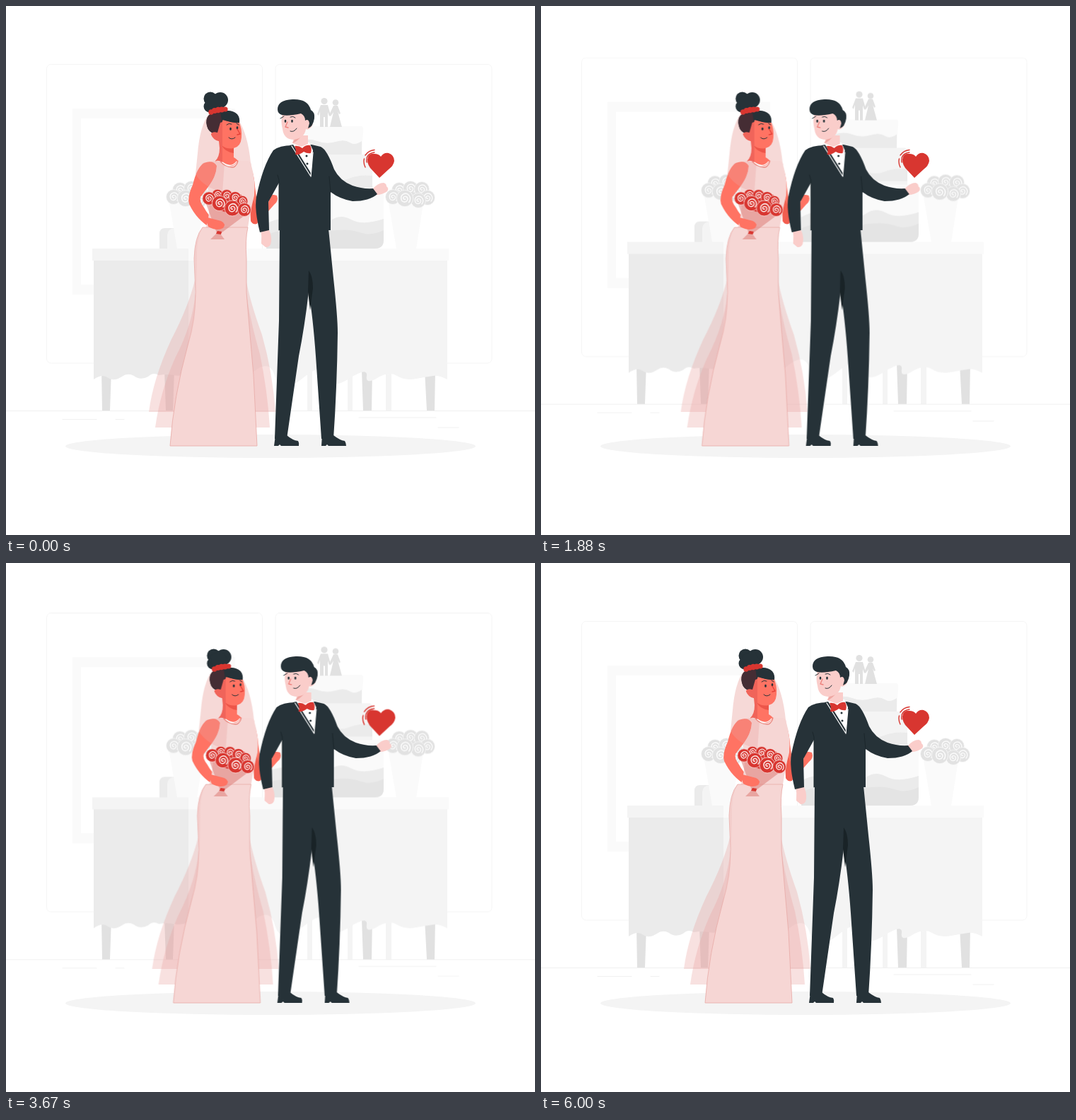
These frames come from a looping animation (748 px wide and 748 px high, 6.04 s). An HTML page without scripts:

```html
<!DOCTYPE html>
<html lang="en">
<head>
<meta charset="utf-8">
<title>Wedding couple</title>
<style>
html, body { margin: 0; width: 100%; height: 100%; overflow: hidden; background: #fff; }
svg { display: block; width: 100%; height: 100%; }
.float, .shake, .beat { animation: float 6.04s linear infinite; }
.shake { animation-name: shake; }
.beat { animation-name: beat; transform-origin: 527.5px 223px; }
@keyframes float {
  0%, 99.34%, 100% { transform: translateY(0); }
  49.67% { transform: translateY(-15px); }
}
@keyframes shake {
  0%, 99.34%, 100% { transform: translateX(0); }
  9.93%, 89.4% { transform: translateX(-1.5px); }
  19.87%, 79.47% { transform: translateX(3px); }
  29.8%, 49.67%, 69.54% { transform: translateX(-6px); }
  39.74%, 59.6% { transform: translateX(6px); }
}
@keyframes beat {
  0%, 19.87%, 30.5%, 49.67%, 69.54%, 80%, 100% { transform: scale(1); }
  9.93%, 24.83%, 59.6%, 74.5% { transform: scale(1.08); }
}
.line { fill: none; stroke-linecap: round; stroke-linejoin: round; }
.dark { fill: #263238; }
.pale { fill: #facdca; }
.skin { fill: #ff7363; }
.red { fill: #d83630; }
.dress { fill: #f6d6d4; }
.tulle { fill: #e9a19e; fill-opacity: .32; }
.g1 { fill: #fafafa; }
.g2 { fill: #f4f4f4; }
.g3 { fill: #ebebeb; }
.g4 { fill: #e1e1e1; }
</style>
</head>
<body>
<svg viewBox="0 0 748 748">
<defs>
  <g id="rose">
    <circle r="10.500" fill="currentColor" stroke-width=".7"/>
    <path class="line" stroke-width="1.500" d="M.5 1A1.800 1.800 0 0 1 -2 -1A3 3 0 0 1 3.500 0A4 4 0 0 1 -4.500 1A5.500 5.500 0 0 1 5 -4A6.500 6.500 0 0 1 5 5"/>
  </g>
  <g id="vase">
    <path class="g1" d="M541 279H590L580 343H552Z"/>
    <g color="#e2e2e2" stroke="#fafafa">
      <use href="#rose" transform="translate(556 260)"/>
      <use href="#rose" transform="translate(572 258)"/>
      <use href="#rose" transform="translate(588 259)"/>
      <use href="#rose" transform="translate(596 271)"/>
      <use href="#rose" transform="translate(583 275)"/>
      <use href="#rose" transform="translate(547 270)"/>
      <use href="#rose" transform="translate(564 272) scale(1.12)"/>
    </g>
  </g>
</defs>

<g class="float">
  <g fill="#fff" stroke="#f5f5f5">
    <rect x="57.500" y="82.500" width="305" height="422.500" rx="6"/>
    <rect x="381" y="82.500" width="306" height="422.500" rx="6"/>
  </g>
  <path class="g1" fill-rule="evenodd" d="M94 145H324V408H94ZM106 159V394H312V159Z"/>
  <path class="line" stroke="#f0f0f0" d="M0 572.500H748M80 584.500H128M155 584.500H167M499 582H608M611 596H640"/>

  <path class="g2" d="M426 515H433V572H426ZM483 515H490V572H483ZM537 515H545V572H537Z"/>
  <path class="g4" d="M135 515H149L147 572H136ZM224 515H238L236 572H226ZM503 515H518L517 572H505ZM592 515H607L606 572H595Z"/>
  <path class="g3" d="M217 345V322Q217 314 225 314H258V345Z"/>
  <path class="g2" d="M228 345V324Q229 314 239 314H262V345Z"/>

  <use href="#vase"/>
  <use href="#vase" x="-310"/>

  <g>
    <path class="g1" d="M411 210V174Q411 170 415 170H502Q506 170 505 176L503 210Z"/>
    <path class="g3" d="M413 192Q427 186 440 191T466 192T486 193T503 191V210H413Z"/>
    <path class="g2" d="M396 262V210H514Q518 211 518 216V262Z"/>
    <path class="g3" d="M396 240Q425 230 448 240T485 244T518 240V257H396Z"/>
    <path class="g1" d="M368 343V262H530Q534 262 534 267V331Q534 343 522 343Z"/>
    <path class="g3" d="M368 308Q390 295 412 306T458 304Q472 293 488 302T534 301V331Q534 343 522 343H368Z"/>
    <path class="g4" d="M368 324Q390 313 412 322T458 318Q484 314 500 320T534 317V331Q534 343 522 343H368Z" opacity=".65"/>
    <g class="g4">
      <circle cx="450" cy="134.500" r="4.600"/>
      <path d="M445 140H455L459 154L457 156L455 150V171H451V157H449V171H444V149L442 155L440 153Z"/>
      <circle cx="466" cy="136.500" r="4.300"/>
      <path d="M463 141H469L473 152L471 153L469 149L475 171H458L463 150L459 156L457 154Z"/>
    </g>
  </g>

  <path class="g2" d="M257 352H624V528Q612 522 604 523T580 527T553 523T525 526T510 523T485 527T455 522T420 526T380 523T340 526T300 523T257 527Z"/>
  <path class="g3" d="M124 352H258V520Q246 524 237 522T216 522Q208 517 201 524Q190 530 181 523Q172 518 164 524Q152 532 143 525Q136 520 124 528Z"/>
  <path class="g1" d="M122 343H626V360H122Z"/>
  <path class="g2" d="M122 343H258V360H122Z"/>
</g>

<ellipse class="g2" cx="374" cy="622.500" rx="290" ry="16.500"/>

<g class="shake">
  <!-- bride: layers behind the body -->
  <g class="tulle">
    <path d="M267 388Q258 425 234 471Q208 527 202 574H242L268 430Z"/>
    <path d="M268 405Q264 450 239 498Q218 545 211 596H240L269 430Z"/>
    <path d="M339 385Q345 418 362 465Q377 518 381 574H348L340 430Z"/>
    <path d="M340 405Q344 440 359 492Q370 545 373 596H350L340 430Z"/>
  </g>
  <path class="dress" d="M287 152Q274 170 271 208L268 237Q281 258 300 262L346 222Q342 181 328 160Z" opacity=".92"/>
  <path class="skin" d="M342 223Q350 230 352 255L356 286L372 276L371 270Q375 265 383 268Q386 276 379 281L357 306Q350 311 346 304Z"/>
  <path d="M346 266L355 286V308Q348 310 346 303Z" fill="#f25e50"/>

  <!-- bride: head -->
  <g class="dark">
    <circle cx="289" cy="131" r="9.500"/>
    <circle cx="303" cy="133" r="11"/>
    <circle cx="288" cy="142" r="8.500"/>
    <path d="M284 131L301 124L310 139L303 150H288Z"/>
    <path d="M284 169Q280 151 302 148Q324 145 330 165L326 169L296 181Q286 179 284 169Z"/>
  </g>
  <path class="skin" d="M303 160Q317 165 329 163Q334 173 333 186Q332 199 322 201V214Q331 219 328 223Q322 230 314 225L296 220Q303 214 303 206V192Q292 187 290 182Q291 176 299 178Z"/>
  <path d="M322 201Q312 203 305 197Q309 206 322 208Z" fill="#ed5549"/>
  <path class="dark" d="M303 150Q318 145 327 153Q331 158 330 165Q317 166 307 160Q304 168 302 176Z"/>
  <path d="M284 169Q280 151 303 148L305 162Q302 172 301 181Q287 181 284 169Z" fill="#452d34"/>
  <path d="M290 181Q292 177 299 179L303 165L306 164V222L296 219Q302 213 302 201L301 191Q293 190 290 181Z" fill="#f0645a"/>
  <g class="red">
    <circle cx="290" cy="150" r="3.700"/><circle cx="295" cy="148" r="4"/><circle cx="300" cy="147" r="4.200"/><circle cx="305" cy="146.500" r="4"/><circle cx="310" cy="146" r="3.600"/>
  </g>
  <g class="line" stroke="#263238">
    <path d="M315 186Q319 190 324 186M312 168Q315 165 319 167M326 166L329 168"/>
    <path d="M317.500 173V174.500M327 171.500V173" stroke-width="2.500"/>
  </g>
  <path class="line" d="M327 174L331 181L327 182" stroke="#e33f37" stroke-width="1.300"/>

  <!-- bride: dress -->
  <path class="skin" d="M280 222Q293 217 298 226Q299 237 288 253L275 270Q273 276 280 285Q286 296 292 300L306 304Q314 309 309 314Q300 320 290 314Q270 303 259 280Q256 270 264 253Q270 228 280 222Z"/>
  <path class="dress" d="M297 219Q303 218 306 222Q319 232 328 219H341Q347 219 347 226Q353 246 351 268Q345 292 342 313H283Q291 285 286 256Q297 242 298 226Z"/>
  <path class="tulle" d="M278 222L297 219L309 222L306 263Q280 257 268 238Z"/>
  <path class="line" d="M303 220Q311 229 322 228Q327 225 328 219" stroke="#e77a70" stroke-width="1.100"/>
  <path class="line" d="M306 221Q318 230 326 220" stroke="#fff" stroke-width="1.200"/>
  <path class="dress" d="M278 313H342Q338 330 340 358V405Q345 466 350 522L355 622H232Q237 552 257 480Q268 443 268 405L266 357Q267 326 278 313Z" stroke="#e8aaa6" stroke-width=".8"/>
  <path d="M278 314Q269 329 270 357L269 408L258 478Q270 442 268 405L266 357Q267 326 278 314Z" fill="#efc4c1" opacity=".45"/>

  <!-- bouquet -->
  <path d="M283 280L343 292L303 322L309 330H289L298 321Z" fill="#df8580" opacity=".6"/>
  <path d="M299 318L305 319L304 323L297 322Z" class="red"/>
  <path class="skin" d="M281 298L304 304Q312 308 307 314Q298 319 286 312Z"/>
  <path class="red" d="M282 267L300 262L333 267L340 290L318 294L294 286Z"/>
  <g color="#d83630" stroke="#fbe5e3">
    <use href="#rose" transform="translate(299 267) scale(.75)"/>
    <use href="#rose" transform="translate(312 268) scale(.8)"/>
    <use href="#rose" transform="translate(324 271) scale(.82)"/>
    <use href="#rose" transform="translate(334 276) scale(.75)"/>
    <use href="#rose" transform="translate(287 272) scale(.88)"/>
    <use href="#rose" transform="translate(302 279) scale(1.020)"/>
    <use href="#rose" transform="translate(320 286) scale(1.050)"/>
    <use href="#rose" transform="translate(337 288) scale(.9)"/>
  </g>

  <!-- groom: legs -->
  <path class="dark" d="M387 315H456L463 385Q469 440 469 462Q468 540 463 612H446L438 495Q434 440 428 404Q422 455 414 495L397 612H380L386 445Z"/>
  <path d="M428 374Q434 382 434 399L430 430L427 404Z" fill="#192327"/>
  <path class="dark" d="M381 607H397Q405 614 413 615Q415 618 414 622H389L387 620L385 622H379ZM447 607H463Q472 614 479 615Q481 618 481 622H456L454 620L452 622H446Z"/>

  <!-- groom: hands and jacket -->
  <path class="pale" d="M360 315H371Q376 324 375 333Q374 342 367 341L361 336Q362 325 360 315ZM518 259Q526 250 534 250Q538 251 538 255Q542 258 539 262Q531 268 521 267Z"/>
  <path class="dark" d="M378 204Q387 197 405 197L432 196L445 199Q454 203 464 231Q472 247 490 254Q504 259 519 258L525 266Q514 276 490 276Q472 273 459 263V317H386V250L371 277L372 317L359 320Q351 288 354 270Q363 226 378 204Z"/>
  <path class="line" d="M386 317V246L384 239M459 263L457 241" stroke="#1b262b"/>

  <!-- groom: shirt and head -->
  <path d="M402 197L410 193L429 193L434 204L431 243Z" fill="#fff"/>
  <path class="dark" d="M401 197L406 196L431 236V244Z"/>
  <path class="line" d="M404 198L431 241L434 207" stroke="#fff" stroke-width="1.200"/>
  <path class="pale" d="M408 183H427V195L418 199L405 194Z"/>
  <path d="M405 194Q412 192 419 182L409 187Z" fill="#efa7a2"/>
  <path class="pale" d="M391 151Q409 145 427 153L430 161Q437 165 431 172Q427 176 424 174Q422 187 407 189Q393 189 391 174Q388 163 391 151Z"/>
  <path class="dark" d="M384 146Q384 133 405 132Q427 131 431 147Q437 150 436 159Q434 171 427 173L429 166Q428 159 423 162Q423 155 417 152Q399 156 390 154Q384 152 384 146Z"/>
  <g class="line" stroke="#263238">
    <path d="M402 177Q407 179 411 173M388 159L393 156M402 157Q406 155 409 158"/>
    <path d="M395 162V163.500M404.500 162V163.500" stroke-width="2.500"/>
  </g>
  <path class="line" d="M398 164L395 171L399 172" stroke="#ee817c" stroke-width="1.300"/>
  <path class="red" d="M408 198Q414 197 419 201Q424 196 430 197Q433 202 431 208Q426 209 421 206Q415 211 409 210Q411 204 408 198Z"/>
  <g class="dark"><circle cx="425" cy="212" r="1.500"/><circle cx="426" cy="223" r="1.500"/></g>
</g>

<g class="beat">
  <path class="red" d="M528 243L515 229Q509 220 512 213Q515 208 521 209Q527 209 530 213Q534 207 541 208Q549 211 549 219Q548 226 541 231Z"/>
  <path class="line" d="M508 228Q505 222 506.500 216M508 211Q513 204 521 203.500M510 221Q508 209 521 207" stroke="#d83630" stroke-width="1.400"/>
</g>
</svg>
</body>
</html>
```
